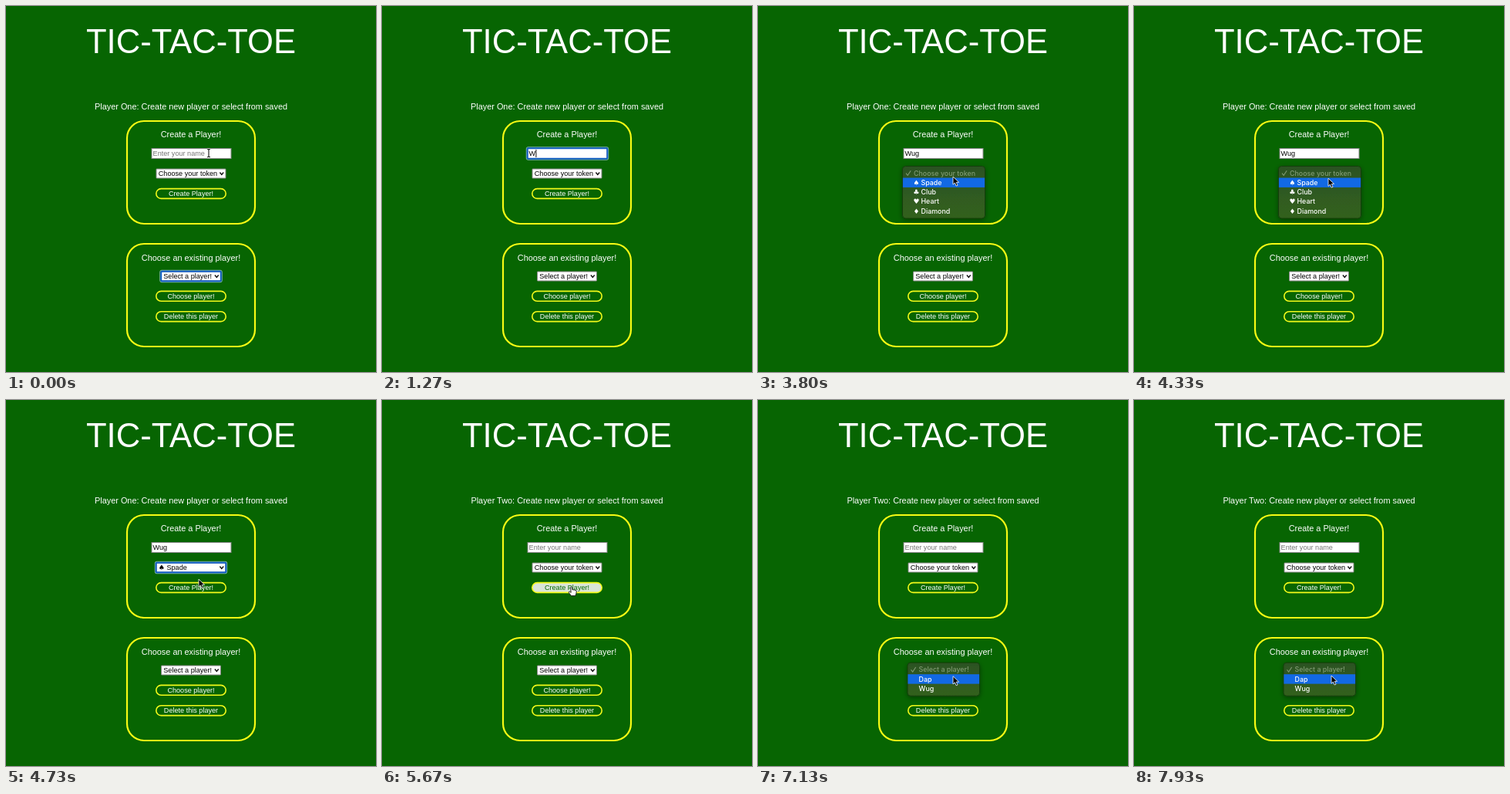
Recreate the animation shown at these times as an HTML page. Size 480 by 474 pixels, loop 8000 ms.

```html
<!DOCTYPE html>
<html lang="en">
<head>
<meta charset="utf-8">
<title>Tic-Tac-Toe</title>
<style>
  html, body { margin: 0; width: 100%; height: 100%; overflow: hidden; background: #076502; }
  svg { display: block; width: 480px; height: 474px; font-family: "Liberation Sans", Arial, sans-serif; font-size: 9.1px; }
  .title { font-size: 43.6px; }
  .label { font-size: 10.9px; }
  .mid { text-anchor: middle; fill: #fff; }
  .panel { fill: none; stroke: #f7fb14; stroke-width: 2.2; }
  .button rect { fill: none; stroke: #f2fa1a; stroke-width: 1.6; }
  .button.hover rect { fill: #dbe5d9; }
  .button.hover text { fill: #0a6a06; }
  .field { fill: #fff; stroke: #858585; stroke-width: 1; }
  .ring { fill: none; stroke: #1560c8; stroke-width: 2; }
  .halo { fill: none; stroke: #a9cdf0; stroke-width: .8; }
  .chevron { fill: none; stroke: #111; stroke-width: 1.5; }
  .menu { font-family: Inter, "DejaVu Sans", sans-serif; font-size: 8.9px; font-weight: 500; fill: #fff; }
  .menu .first { fill: #7f9a74; }
  .menu .suit, .suit { font-family: "DejaVu Sans", sans-serif; }
</style>
</head>
<body>
<svg viewBox="0 0 480 474">
  <defs>
    <linearGradient id="glass" x1="0" y1="0" x2="0" y2="1">
      <stop offset="0" stop-color="#2c5221"/>
      <stop offset="1" stop-color="#32611f"/>
    </linearGradient>
    <filter id="shadow" x="-20%" y="-20%" width="140%" height="150%">
      <feDropShadow dx="0" dy="2" stdDeviation="3" flood-color="#000" flood-opacity=".4"/>
    </filter>
  </defs>
  <rect width="480" height="474" fill="#076502"/>
  <text class="mid title" x="240" y="60.5">TIC-TAC-TOE</text>
  <text class="mid label" id="prompt" x="240" y="134"></text>
  <rect class="panel" x="157" y="149" width="166" height="133" rx="22"/>
  <rect class="panel" x="157" y="308" width="166" height="133" rx="22"/>
  <text class="mid label" x="240" y="170.3">Create a Player!</text>
  <text class="mid label" x="240" y="329.8">Choose an existing player!</text>
  <g id="form"></g>
  <g id="menus"></g>
  <g id="pointer">
    <path id="arrow" d="M0 0V10.2L2.4 8L4.1 12L6 11.2L4.3 7.3H7.6Z" fill="#000" stroke="#fff" stroke-width=".8"/>
    <g id="beam" fill="none">
      <path d="M-2-5.2Q0-5.2 0-3.8V4Q0 5.2-2 5.2M2-5.2Q0-5.2 0-3.8M0 4Q0 5.2 2 5.2" stroke="#fff" stroke-width="2.2"/>
      <path d="M-2-5.2Q0-5.2 0-3.8V4Q0 5.2-2 5.2M2-5.2Q0-5.2 0-3.8M0 4Q0 5.2 2 5.2" stroke="#111" stroke-width="1.1"/>
    </g>
    <path id="hand" d="M-.9.6Q0-.6 .9.6L1.6 4Q2.5 3 3.4 4.1Q4.5 3.4 5.2 4.6Q6.6 4.2 6.8 5.8L6.4 8.6L5.4 11.6H0L-3.2 7.4Q-3.4 5.8-1.8 6.3L-.3 7.4Z" fill="#fff" stroke="#111" stroke-width=".9"/>
  </g>
</svg>
<script>
const LOOP = 8000, STEP = 1000 / 15;
const NEW_NAME = "Wug", SAVED_NAME = "Dap";
const $ = id => document.getElementById(id);
const rect = (cls, x, y, w, h, rx = 0) =>
  `<rect class="${cls}" x="${x}" y="${y}" width="${w}" height="${h}" rx="${rx}"/>`;

const button = (id, y, text) =>
  `<g class="button" id="${id}">${rect("", 194.8, y, 90.4, 12.8, 6.4)}` +
  `<text class="mid" x="240" y="${y + 9.5}">${text}</text></g>`;

const focus = (id, x, y, w, h) =>
  `<g id="${id}">${rect("halo", x - 1.7, y - 1.7, w + 3.4, h + 3.4, 2)}` +
  `${rect("ring", x - .3, y - .3, w + .6, h + .6, 1.2)}</g>`;

const select = (id, x, y, w) =>
  rect("field", x, y, w, 12, .5) + focus(id + "Ring", x, y, w, 12) +
  `<text id="${id}" x="${x + 2.8}" y="${y + 9.2}"></text>` +
  `<path class="chevron" d="M${x + w - 7.6} ${y + 4.6}l2.4 2.8l2.4-2.8"/>`;

$("form").innerHTML =
  rect("field", 189, 184.5, 103, 13) + focus("nameRing", 189, 184.5, 103, 13) +
  `<text id="name" x="190.6" y="194.2"></text>` +
  `<rect id="caret" y="186" width="1" height="10" fill="#111"/>` +
  select("token", 195, 211, 90) + button("create", 236.6, "Create Player!") +
  select("saved", 201.5, 344, 77) + button("choose", 369.4, "Choose player!") +
  button("delete", 395.8, "Delete this player");

const ROW = 12.2;
function menu(id, x, y, w, h, items) {
  const rows = items.map(([icon, text], i) => {
    const base = y + 12.2 + i * ROW;
    const cls = i ? "" : "first", left = x + (icon && i ? 24 : 14.5);
    return (i ? `<text class="suit" x="${x + 14}" y="${base}">${icon}</text>`
              : `<path d="M${x + 4.5} ${base - 3}l2.2 2.6l4-6" fill="none" stroke="#7f9a74" stroke-width="1.1"/>`) +
      `<text class="${cls}" x="${left}" y="${base}">${text}</text>`;
  }).join("");
  return `<g class="menu" id="${id}"><rect x="${x}" y="${y}" width="${w}" height="${h}" rx="4"
    fill="url(#glass)" stroke="#163b0d" stroke-width=".9" filter="url(#shadow)"/>
    <rect id="${id}Row" x="${x + .4}" y="${y + 2.8 + ROW}" width="${w - .8}" height="12.4" fill="#1269e4"/>${rows}</g>`;
}
$("menus").innerHTML =
  menu("tokenMenu", 187.5, 207.5, 107, 67.5,
    [["", "Choose your token"], ["♠", "Spade"], ["♣", "Club"], ["♥", "Heart"], ["♦", "Diamond"]]) +
  menu("savedMenu", 194, 340.2, 93.5, 43,
    [["", "Select a player!"], ["", SAVED_NAME], ["", NEW_NAME]]);

// time, x, y of the pointer's hot spot
const PATH = [
  [0, 263, 190.5], [2930, 263, 190.5], [3130, 261, 200], [3330, 256, 212], [3470, 255, 215],
  [3800, 253, 221], [4300, 252, 223], [4600, 252, 224], [4733, 250, 232], [4870, 249, 238],
  [5200, 245.5, 242], [5900, 245.5, 242], [6066, 247, 262], [6266, 250, 318], [6400, 251, 342],
  [6600, 252, 349], [6870, 253, 357], [7600, 253, 359], [7730, 256, 357], [LOOP, 256, 357]
];

// typed text by start time
const TYPED = [[1270, 1], [1870, 2], [2070, 3]];

function pointerAt(t) {
  const i = Math.max(1, PATH.findIndex(p => p[0] > t));
  const [a, b] = [PATH[i - 1], PATH[i]];
  const k = (t - a[0]) / (b[0] - a[0]);
  return [a[1] + (b[1] - a[1]) * k, a[2] + (b[2] - a[2]) * k];
}

const show = (id, on) => { $(id).style.display = on ? "" : "none"; };
const within = (t, ...spans) => spans.some(([a, b]) => t >= a && t < b);

function draw(time) {
  const t = Math.floor((time + 4) / STEP) * STEP + 4;
  const done = t >= 5470;
  const [x, y] = pointerAt(t - 4);
  const count = done ? 0 : TYPED.reduce((n, [at, len]) => t >= at ? len : n, 0);
  const picked = within(t, [4470, 5470]);

  $("prompt").textContent = `Player ${done ? "Two" : "One"}: Create new player or select from saved`;
  $("name").textContent = count ? NEW_NAME.slice(0, count) : "Enter your name";
  $("name").setAttribute("fill", count ? "#000" : "#757575");
  $("token").innerHTML = picked ? '<tspan class="suit">♠</tspan> Spade' : "Choose your token";
  $("saved").textContent = "Select a player!";

  show("nameRing", within(t, [270, 3470]));
  show("tokenRing", within(t, [3470, 5470]));
  show("savedRing", t < 270 || t >= 6660);
  show("caret", within(t, [270, 800], [1270, 2530], [3000, 3470]));
  $("caret").setAttribute("x", count ? 190.8 + $("name").getComputedTextLength() : 190);

  show("tokenMenu", within(t, [3470, 4470]));
  show("savedMenu", t >= 6660);
  show("tokenMenuRow", y >= 219.5);
  show("savedMenuRow", y >= 354.5);

  const overButton = y > 236 && y < 250;
  const overInput = y < 198;
  $("create").classList.toggle("hover", overButton);
  show("pointer", !within(t, [1270, 2930]));
  show("beam", overInput);
  show("hand", overButton);
  show("arrow", !overInput && !overButton);
  $("pointer").setAttribute("transform", `translate(${x} ${y})`);
}

const start = performance.now();
function tick() {
  draw((performance.now() - start) % LOOP);
  requestAnimationFrame(tick);
}
tick();
</script>
</body>
</html>
```
